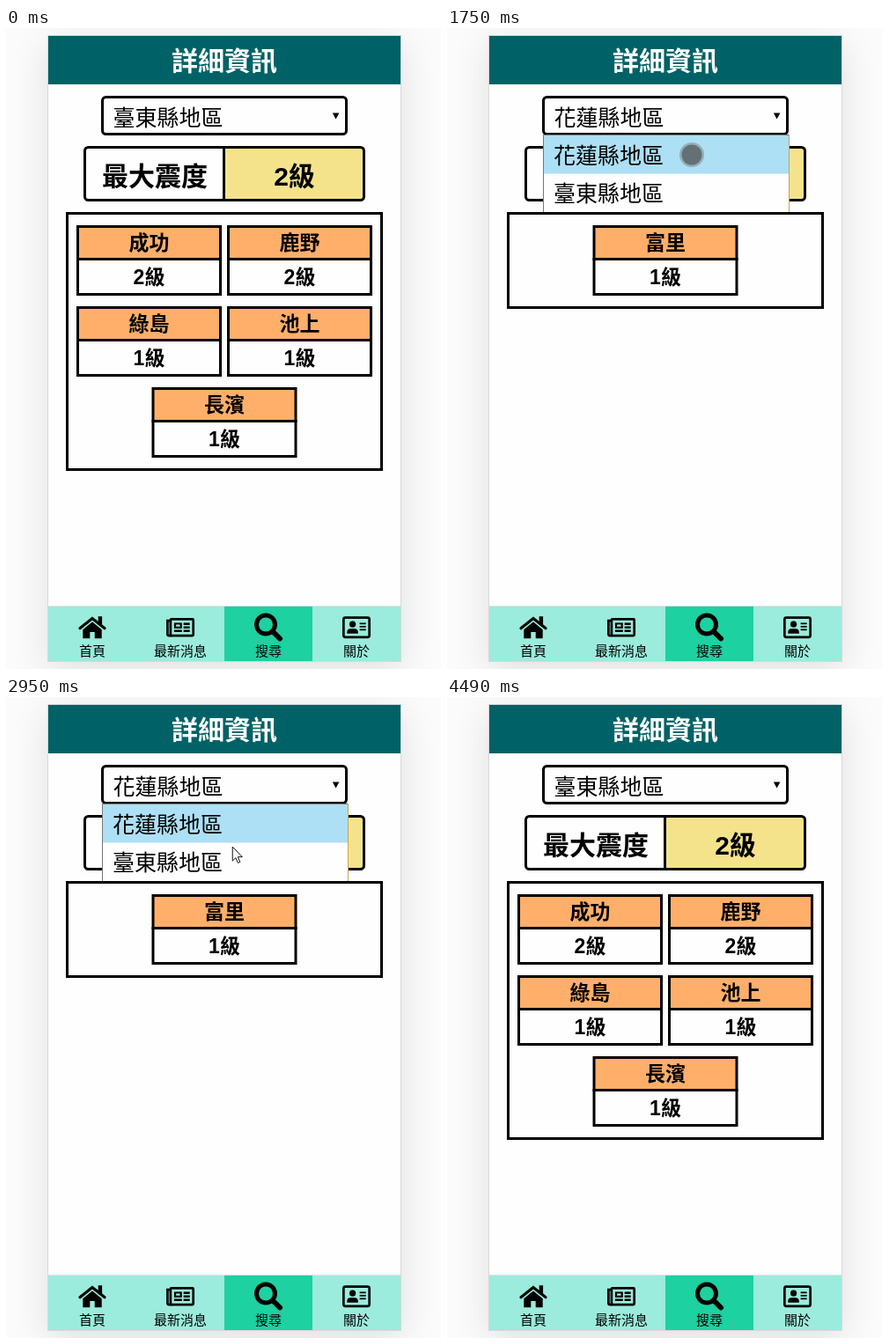
An HTML page that plays this animation: 494x728 px, repeating every 4950 ms.

```html
<!DOCTYPE html>
<html lang="zh-Hant">
<head>
<meta charset="utf-8">
<title>詳細資訊</title>
<style>
  html, body { margin: 0; width: 100%; height: 100%; overflow: hidden; background: #fbfbfb; }
  .phone {
    position: absolute; left: 47px; top: 8px; width: 400px; height: 710px;
    border: 1px solid #d8d8d8; background: #fefefe;
    box-shadow: 0 10px 40px rgba(0, 0, 0, .11);
  }
  svg { position: absolute; left: 0; top: 0; }
  text { font-family: "Liberation Sans", "Noto Sans CJK TC", "Noto Sans CJK", sans-serif; }
  .bold { font-weight: 700; }
  .light { font-weight: 350; }
  .mid { text-anchor: middle; }
  .box { fill: none; stroke: #000; stroke-width: 3; }
  .icon { stroke: #000; stroke-width: 2.7; fill: none; }
  .solid { fill: #000; stroke: none; }
</style>
</head>
<body>
<div class="phone"></div>
<svg id="stage" width="494" height="728" viewBox="0 0 494 728"></svg>
<script>
const LOOP = 4950;
const HUALIEN = 0, TAITUNG = 1;
const regions = [
  { name: '花蓮縣地區', max: 1, towns: [['富里', 1]] },
  { name: '臺東縣地區', max: 2,
    towns: [['成功', 2], ['鹿野', 2], ['綠島', 1], ['池上', 1], ['長濱', 1]] }
];

const rect = (x, y, w, h, attrs) => `<rect x="${x}" y="${y}" width="${w}" height="${h}" ${attrs}/>`;

// CJK glyphs sit around a line 0.38em above the baseline.
const label = (str, x, centerY, size, cls, attrs = '') =>
  `<text x="${x}" y="${centerY + size * .38}" font-size="${size}" class="${cls}" ${attrs}>${str}</text>`;

function card([town, level], x, y) {
  return rect(x + 1.5, y + 1.5, 162, 36.5, 'fill="#ffaf69"') +
    rect(x + 1.5, y + 1.5, 162, 77, 'class="box"') +
    `<path class="box" d="M${x} ${y + 38.5}h165"/>` +
    label(town, x + 82.5, y + 19.5, 23, 'bold mid') +
    label(level + '級', x + 82.5, y + 58, 23, 'bold mid');
}

function panel(towns) {
  const height = 18 + 92 * Math.ceil(towns.length / 2);
  const cards = towns.map((town, i) => {
    const alone = i % 2 === 0 && i === towns.length - 1;
    return card(town, alone ? 165.5 : i % 2 ? 251 : 80, 224 + 92 * Math.floor(i / 2));
  });
  return rect(69.5, 210.5, 357, height - 3, 'class="box" style="fill:#fefefe"') + cards.join('');
}

const icons = [
  `<path d="M2 15.3L16 4L30 15.3" stroke-width="3.2" stroke-linecap="round"/>
   <path class="solid" d="M22.7 1.8h4.4v9h-4.4zM16 8.1L26.7 16.7V26.7H18.7V19.6H13.3V26.7H5.3V16.7Z"/>`,
  `<rect x="4.9" y="4.9" width="25.8" height="18.7" rx="1"/>
   <path d="M5 6.7H1.4V22q0 1.6 1.8 1.6H6"/>
   <path d="M10 10h6.7v4.4H10z" stroke-width="2.2"/>
   <path class="solid" d="M8.9 16.9h8.9v2.7H8.9zM19.6 8.9h7.1v2.7h-7.1zM19.6 12.9h7.1v2.7h-7.1zM19.6 16.9h7.1v2.7h-7.1z"/>`,
  `<circle cx="13" cy="11" r="10.5" stroke-width="5"/>
   <path d="M21 19l8 8" stroke-width="6" stroke-linecap="round"/>`,
  `<rect x="1.35" y="3.1" width="29.3" height="22.2" rx="2"/>
   <circle class="solid" cx="11.6" cy="10.7" r="3.6"/>
   <path class="solid" d="M5.3 21.3v-1.6q0-4 3.9-4h4.7q3.9 0 3.9 4v1.6zM19.6 8.9h7.1v1.8h-7.1zM19.6 12.4h7.1v1.8h-7.1zM19.6 16h7.1v1.8h-7.1z"/>`
];

const tabs = ['首頁', '最新消息', '搜尋', '關於'].map((name, i) =>
  rect(48 + 100 * i, 657, 100, 62, `fill="${i === 2 ? '#1dd1a1' : '#9becdc'}"`) +
  `<g class="icon" transform="translate(${82 + 100 * i} 666.5)">${icons[i]}</g>` +
  label(name, 98 + 100 * i, 707, 15, 'light mid')).join('');

const stage = document.getElementById('stage');
stage.innerHTML =
  rect(48, 9, 400, 55, 'fill="#006266"') +
  label('詳細資訊', 248, 37, 30, 'bold mid', 'fill="#fff"') +
  rect(109.5, 78.5, 277, 42, 'class="box" rx="4"') +
  label('', 121.5, 101, 25, 'light', 'id="chosen"') +
  '<path d="M370.8 96.5h7.6l-3.8 7z"/>' +
  rect(247, 135, 160, 61, 'rx="4" fill="#f5e38c"') +
  rect(89.5, 135.5, 317, 60, 'class="box" rx="4"') +
  '<path class="box" d="M247.5 135v61"/>' +
  label('最大震度', 169, 168, 30, 'bold mid') +
  label('', 327.5, 168, 30, 'bold mid', 'id="max"') +
  '<g id="menu">' +
    rect(109, 121, 280, 88, 'fill="#fefefe"') +
    rect(110, 122, 278, 43.5, 'id="highlight" fill="#ade0f5"') +
    '<path d="M109.5 121v88M109 121.5h280" stroke="#777" fill="none"/>' +
    '<path d="M388.5 121v88" stroke="#c6a34f"/>' +
    regions.map((r, i) => label(r.name, 121, 144.5 + 43 * i, 25, 'light')).join('') +
  '</g>' +
  regions.map((r, i) => `<g id="panel${i}">${panel(r.towns)}</g>`).join('') +
  '<path d="M48 656.5h400" stroke="#e4e4e4"/>' + tabs +
  '<circle id="press" r="15" fill="rgba(240,240,60,.65)"/>' +
  `<g id="release"><circle r="14" fill="rgba(135,140,142,.6)"/>
     <circle r="11.5" fill="rgba(58,64,66,.55)"/></g>` +
  `<path id="cursor" d="M.5 .5V16.5L4.2 13L6.7 18.8L9 17.8L6.6 12H11.6Z"
     fill="#fff" stroke="#111"/>`;

const el = id => document.getElementById(id);
const show = (id, on) => el(id).setAttribute('visibility', on ? 'visible' : 'hidden');
const place = (id, [x, y]) => el(id).setAttribute('transform', `translate(${x} ${y})`);
const within = (t, a, b) => t >= a && t < b;

// Pointer glides: the position advances in equal hard steps and eases out.
const glides = [
  { start: 980, end: 1440, until: 1750, steps: 6, from: [302, 98], to: [277, 143] },
  { start: 2540, end: 3020, until: 3100, steps: 6, from: [300, 122], to: [255.5, 171] },
  { start: 3100, end: 3250, until: 3410, steps: 1, from: [253, 178], to: [251, 185] },
  { start: 4340, end: 4420, until: 4490, steps: 1, from: [407, 719], to: [407, 723] }
];

function pointerAt(t) {
  const g = glides.find(g => within(t, g.start, g.until));
  if (!g) return null;
  // The tolerance absorbs source times rounded to 10 ms.
  const step = Math.floor((t - g.start + 4) / (g.end - g.start) * g.steps);
  const eased = 1 - (1 - Math.min(1, step / g.steps)) ** 2;
  return g.from.map((v, i) => v + (g.to[i] - v) * eased);
}

function render(t) {
  const region = within(t, 1750, 3410) ? HUALIEN : TAITUNG;
  const hovered = within(t, 1670, 3020) ? HUALIEN : TAITUNG;
  const firstRelease = within(t, 1750, 2140);
  const pointer = pointerAt(t);

  el('chosen').textContent = regions[region].name;
  el('max').textContent = regions[region].max + '級';
  regions.forEach((_, i) => show('panel' + i, i === region));

  show('menu', within(t, 980, 1840) || within(t, 2540, 3410));
  el('highlight').setAttribute('y', hovered === HUALIEN ? 122 : 165);

  show('cursor', pointer);
  if (pointer) {
    place('cursor', pointer);
    place('press', pointer);
  }
  show('press', within(t, 1670, 1750) || within(t, 3330, 3410));
  show('release', firstRelease || within(t, 3410, 3640));
  place('release', firstRelease ? [278, 144] : [252, 186]);
}

const began = performance.now();
function frame() {
  render((performance.now() - began) % LOOP);
  requestAnimationFrame(frame);
}
frame();
</script>
</body>
</html>
```
